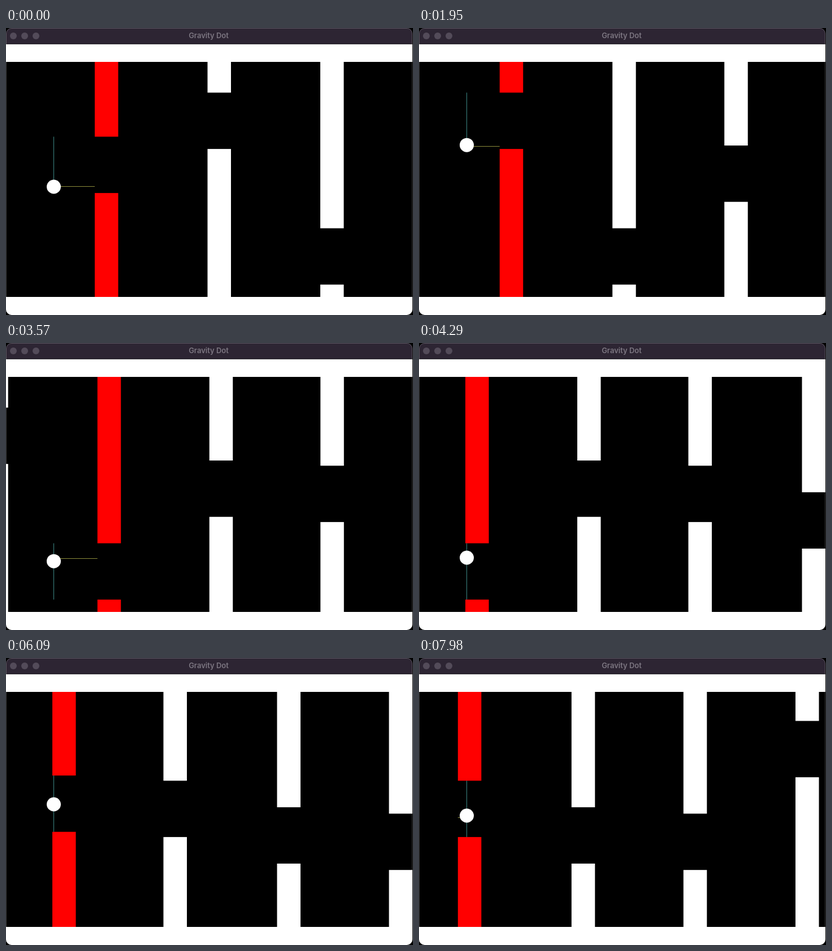
An HTML page for the animation above (8000 ms loop, 720 by 508 pixels).

```html
<!DOCTYPE html>
<html lang="en">
<head>
<meta charset="utf-8">
<title>Gravity Dot</title>
<style>
  html, body { margin: 0; width: 100%; height: 100%; overflow: hidden; background: #000; }
  svg { display: block; width: 100vw; height: 100vh; }
  text { font: 600 13px Inter, "Open Sans", sans-serif; }
</style>
</head>
<body>
<svg viewBox="0 0 720 508">
  <defs>
    <clipPath id="win"><rect width="719" height="508" rx="10"/></clipPath>
  </defs>
  <rect width="720" height="508"/>
  <g clip-path="url(#win)">
    <rect y="28.5" width="719" height="31.5" fill="#fff"/>
    <rect y="476" width="719" height="32" fill="#fff"/>
    <g id="pipes"></g>
    <line id="reach" stroke="#8b8b3a"/>
    <line id="gap" x1="84.5" x2="84.5" stroke="#3d8a86"/>
    <circle id="dot" cx="84.5" r="12.5" fill="#fff"/>
    <rect width="719" height="28" fill="#2d2533"/>
    <rect y="27.5" width="719" height="1" fill="#15101a"/>
    <g fill="#534b59">
      <circle cx="13" cy="14" r="6"/>
      <circle cx="33" cy="14" r="6"/>
      <circle cx="53" cy="14" r="6"/>
    </g>
    <text x="358.5" y="18" text-anchor="middle" fill="#7c7681">Gravity Dot</text>
  </g>
  <rect x=".5" y=".5" width="718" height="507" rx="9.5" fill="none" stroke="#fff" stroke-opacity=".22"/>
</svg>
<script>
const LOOP = 8000, STEP = 30;
const TOP = 60, FLOOR = 476, PIPE_W = 41.5, GAP = 99.7, DOT_X = 84.5;

// [starting x, top of the gap]
const pipes = [
  [157, 192.4], [356.5, 114.4], [556, 354.5], [754, 208],
  [950.5, 217.2], [1151.5, 264.2], [1349.5, 275.5], [1547.7, 111.4]
];

// [seconds, distance scrolled]
const scrollKeys = [
  [0, 0], [1.02, 109.8], [2.88, 317.8], [4.29, 474],
  [6.09, 672], [6.81, 750.2], [7.98, 881.7]
];

// [seconds, y, vertical speed in px/s]
const dotKeys = [
  [0, 281, 30], [0.42, 248, -170], [1.02, 248, 150], [1.34, 276, 0],
  [2.55, 140, 0], [2.88, 169.5, 180], [3.25, 275, 320], [3.8, 425, 0],
  [4.29, 380, -50], [4.65, 410, 150], [4.95, 428, 0], [6.09, 259, -190],
  [6.81, 268.5, 210], [7.38, 313, 0], [7.98, 279, -210]
];

function span(keys, t) {
  let i = 0;
  while (i < keys.length - 2 && t >= keys[i + 1][0]) i++;
  const a = keys[i], b = keys[i + 1], d = b[0] - a[0];
  return { a, b, d, s: (t - a[0]) / d };
}

function scrollAt(t) {
  const { a, b, s } = span(scrollKeys, t);
  return a[1] + (b[1] - a[1]) * s;
}

function dotAt(t) {
  const { a, b, d, s } = span(dotKeys, t);
  const r = 1 - s;
  return a[1] + (b[1] - a[1]) * s * s * (3 - 2 * s)
    + d * s * r * (a[2] * r - b[2] * s);
}

const el = id => document.getElementById(id);
const set = (node, attrs) => {
  for (const k in attrs) node.setAttribute(k, attrs[k]);
};
const make = (tag, parent) =>
  parent.appendChild(document.createElementNS("http://www.w3.org/2000/svg", tag));

const nodes = pipes.map(([, top]) => {
  const g = make("g", el("pipes"));
  const low = top + GAP;
  set(make("rect", g), { y: TOP, width: PIPE_W, height: top - TOP });
  set(make("rect", g), { y: low, width: PIPE_W, height: FLOOR - low });
  return g;
});

function draw(t) {
  const shift = scrollAt(t), y = dotAt(t);
  const next = pipes.findIndex(p => p[0] - shift + PIPE_W >= DOT_X);
  nodes.forEach((g, i) => set(g, {
    transform: `translate(${pipes[i][0] - shift})`,
    fill: i === next ? "#f00" : "#fff"
  }));

  const [x, top] = pipes[next];
  // The sensor line lags the dot by one game tick.
  const lag = Math.floor(dotAt(t - 1 / 60)) + 0.5;
  set(el("reach"), { x1: DOT_X, x2: x - shift, y1: lag, y2: lag });
  set(el("gap"), { y1: Math.min(top, y), y2: Math.max(top + GAP, y) });
  set(el("dot"), { cy: y });
}

const start = performance.now();
function tick() {
  const ms = (performance.now() - start) % LOOP;
  draw(Math.floor(ms / STEP) * STEP / 1000);
  requestAnimationFrame(tick);
}
tick();
</script>
</body>
</html>
```
